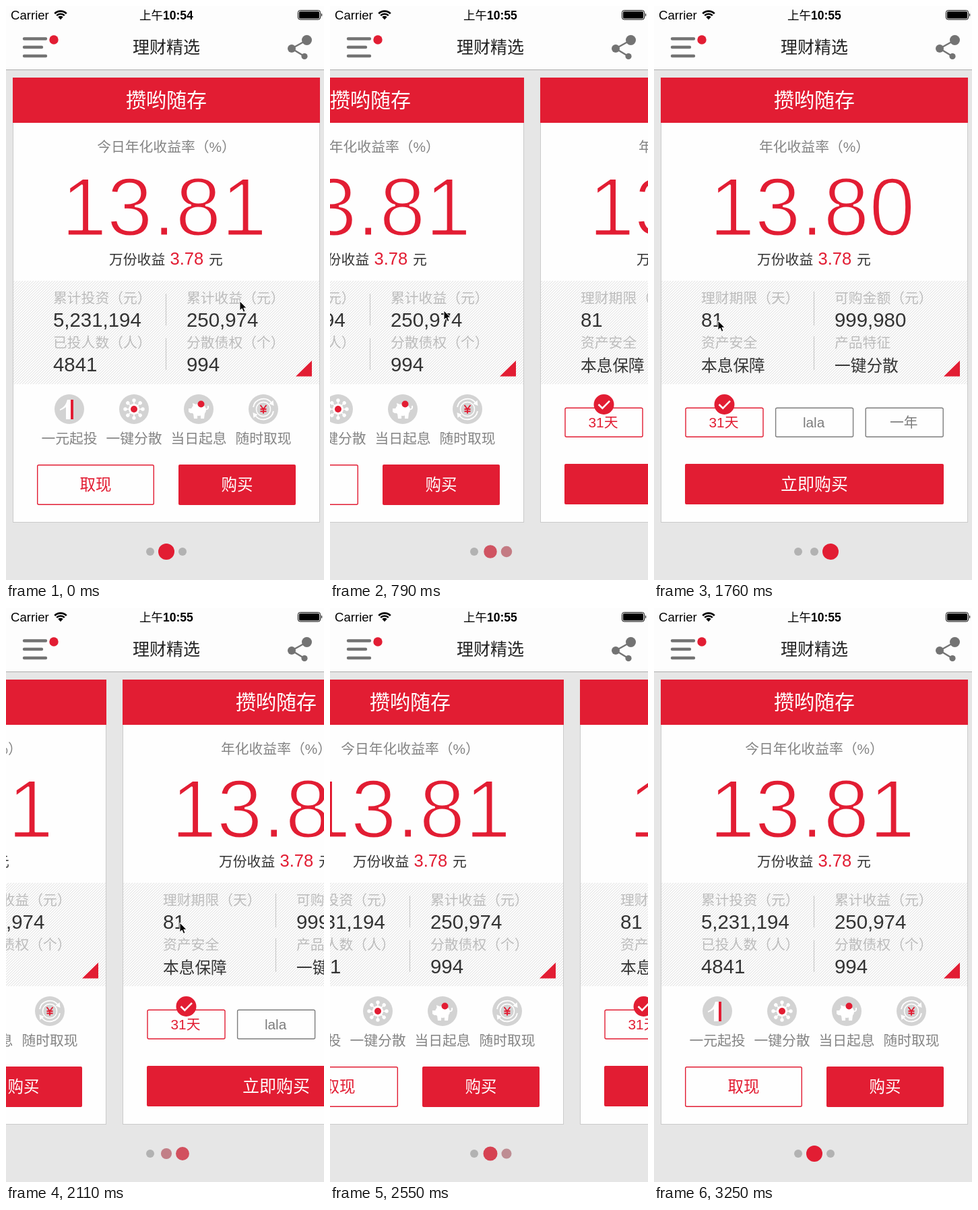
Recreate the animation shown at these times as an HTML page. Size 472 by 850 pixels, loop 3400 ms.

```html
<!DOCTYPE html>
<html lang="zh-CN">
<head>
<meta charset="utf-8">
<title>理财精选</title>
<style>
html, body { margin: 0; width: 100%; height: 100%; overflow: hidden; background: #e6e6e6; }
svg { display: block; width: 472px; height: 850px; }
text { font-family: "Liberation Sans", "Noto Sans CJK SC", "Noto Sans CJK", sans-serif; font-weight: 300; white-space: pre; }
.mid { text-anchor: middle; }
.rate { stroke: #fefefe; stroke-width: 3px; stroke-linejoin: round; }
</style>
</head>
<body>
<svg id="stage" viewBox="0 0 472 850" xmlns="http://www.w3.org/2000/svg"></svg>
<script>
const RED = '#e21d33', INK = '#333', GREY = '#848484', PALE = '#bcbcbc';
const LOOP = 3400, PAGE = 480;

// ---------- drawing helpers ----------
const text = (x, y, size, str, fill, cls = '') =>
  `<text x="${x}" y="${y}" font-size="${size}" fill="${fill}" class="${cls}">${str}</text>`;
const mid = (x, y, size, str, fill) => text(x, y, size, str, fill, 'mid');
const rect = (x, y, w, h, fill, more = '') =>
  `<rect x="${x}" y="${y}" width="${w}" height="${h}" fill="${fill}" ${more}/>`;
const disc = (x, y, r, fill, more = '') =>
  `<circle cx="${x}" cy="${y}" r="${r}" fill="${fill}" ${more}/>`;
const path = (d, fill, stroke = 'none', width = 0, more = '') =>
  `<path d="${d}" fill="${fill}" stroke="${stroke}" stroke-width="${width}" ${more}/>`;
const frame = (x, y, w, h, color) =>
  rect(x, y, w, h, '#fefefe', `rx="2" stroke="${color}" stroke-width="1.4"`);

// ---------- cards ----------
function stat(x, y, label, value, cjk) {
  return text(x, y, 20.8, label, PALE) +
    text(x, y + 34.8, cjk ? 23.7 : 29.4, value, INK);
}

function card(dx, caption, rate, stats, bars, rest) {
  const [a, b, c, d] = stats;
  return `<g transform="translate(${dx} 0)">` +
    rect(10.5, 106.5, 455, 658, '#fefefe', 'stroke="#cbcbcb"') +
    rect(10, 106, 456, 67, RED) +
    mid(238, 150, 30, '攒哟随存', '#fff') +
    mid(238, 216, 20.8, caption, GREY) +
    text(82, 339.5, 122, rate, RED, 'rate') +
    text(153, 382.5, 20.8, '万份收益', INK) +
    text(243.5, 383, 25.5, '3.78', RED) +
    text(301, 382.5, 20.8, '元', INK) +
    rect(11, 407, 454, 153, 'url(#hatch)') +
    stat(70, 440.2, ...a) + stat(268, 440.2, ...b) +
    stat(70, 506.2, ...c) + stat(268, 506.2, ...d) +
    bars.map(([y, h]) => rect(237, y, 1, h, '#c4c4c4')).join('') +
    path('M454 525V548.5H430Z', RED) + rest + '</g>';
}

// ---------- feature icons, each around its own centre ----------
const one = path('M-14 0C-9 -2 -5 -6 -3 -14H2V15H-5V-3C-8 -1 -11 1 -14 2Z', '#fff') +
  rect(2, -14, 4, 29, RED);

let spread = disc(0, 0, 8, '#fff');
for (let i = 0; i < 8; i++) {
  spread += `<g transform="rotate(${i * 45})">` +
    path('M0 0V-12', 'none', '#fff', 1.6) + disc(0, -13, 2.7, '#fff') + '</g>';
}
spread += disc(0, 0, 5, RED);

const pig = '<ellipse cx="0" cy="1" rx="11" ry="9" fill="#fff"/>' +
  path('M-9 -9L-4 -7L-8 -2ZM-15 -1H-8V6H-12L-15 4ZM-8 6H-2V14H-7ZM3 6H9L8 14H3Z', '#fff') +
  path('M10 0Q15 1 14 -5', 'none', '#fff', 2) + disc(3.5, -7.5, 5, RED);

const arc = path('M-15 -3A15.3 15.3 0 0 1 12 -9.5', 'none', '#fff', 1.8) +
  path('M15.5 -5L8.5 -8L14.5 -13Z', '#fff');
const cycle = arc + `<g transform="rotate(180)">${arc}</g>` +
  disc(0, 0, 10.5, 'none', 'stroke="#fff" stroke-width="1.4"') +
  path('M-4.5 -6L0 0L4.5 -6M0 0V6.5M-4.5 0H4.5M-4.5 3.2H4.5', 'none', RED, 1.9);

const features = [[one, '一元起投'], [spread, '一键分散'], [pig, '当日起息'], [cycle, '随时取现']]
  .map(([icon, label], i) => {
    const x = 94 + i * 96;
    return `<g transform="translate(${x} 597)">${disc(0, 0, 22, '#d3d3d3')}${icon}</g>` +
      mid(x, 648, 20.8, label, GREY);
  }).join('');

const current = card(0, '今日年化收益率（%）', '13.81', [
  ['累计投资（元）', '5,231,194'], ['累计收益（元）', '250,974'],
  ['已投人数（人）', '4841'], ['分散债权（个）', '994']
], [[426, 47], [492, 47]],
  features + frame(46.7, 679.7, 172.6, 58.6, RED) + mid(133, 717, 23.5, '取现', RED) +
  rect(256, 679, 174, 60, RED, 'rx="2"') + mid(343, 717, 23.5, '购买', '#fff'));

const fixed = card(PAGE, '年化收益率（%）', '13.80', [
  ['理财期限（天）', '81'], ['可购金额（元）', '999,980'],
  ['资产安全', '本息保障', 1], ['产品特征', '一键分散', 1]
], [[423, 50], [489, 50]],
  [['31天', RED], ['lala', '#7d7d7d'], ['一年', '#7d7d7d']].map(([label, color], i) =>
    frame(47 + i * 133.6, 595.3, 115, 42.7, color) +
    mid(103.5 + i * 133.6, 624, 20.8, label, color)).join('') +
  disc(104.5, 590, 15, RED) +
  path('M96.5 590L102.3 595.7L113 584.8', 'none', '#fff', 2.6) +
  rect(46, 678, 384, 60, RED, 'rx="2"') + mid(238, 716.5, 25, '立即购买', '#fff'));

// ---------- bars at the top ----------
const wifi = [[12.3, 2.6], [8.2, 2.6]].map(([r, w]) => {
  const k = r * 0.71;
  return path(`M${81 - k} ${20 - k}A${r} ${r} 0 0 1 ${81 + k} ${20 - k}`, 'none', '#000', w);
}).join('') + path('M81 20.3L77.3 16.2A5.4 5.4 0 0 1 84.7 16.2Z', '#000');

const topBar = rect(0, 0, 472, 94, '#fdfdfd') + rect(0, 94, 472, 1, '#adadad') +
  text(7, 20, 18.6, 'Carrier', '#000') + wifi +
  '<text x="198" y="20" font-size="17.5"><tspan style="font-weight:500">上午</tspan>' +
  '<tspan id="clock" style="font-weight:700"></tspan></text>' +
  rect(433.5, 6.5, 33, 13.5, 'none', 'rx="3" stroke="#000"') +
  rect(435, 8, 30, 10.5, '#000', 'rx="1.5"') + path('M468 10.5Q470.5 13.2 468 16Z', '#000') +
  path('M27 48.5H59M27 61H53M27 74H59', 'none', '#737373', 4.4, 'stroke-linecap="round"') +
  disc(71, 50, 6.7, RED) +
  '<text x="238" y="70" font-size="25" fill="#222" class="mid" style="font-weight:500">理财精选</text>' +
  path('M446.5 50.5L424 63L443 74.5', 'none', '#737373', 2.4) +
  disc(446.5, 50.5, 7.5, '#737373') + disc(424, 63, 6, '#737373') + disc(443, 74.5, 4.6, '#737373');

const stage = document.getElementById('stage');
stage.innerHTML =
  '<defs><pattern id="hatch" width="4" height="4" patternUnits="userSpaceOnUse">' +
  rect(0, 0, 4, 4, '#fcfcfc') +
  path('M-1 1L1 -1M0 4L4 0M3 5L5 3', 'none', '#dedede', 0.9) + '</pattern></defs>' +
  rect(0, 0, 472, 850, '#e6e6e6') +
  `<g id="deck">${current}${fixed}</g>` + topBar +
  [214, 238, 262].map(x => disc(x, 808, 6, '#b2b2b2', 'class="dot"')).join('') +
  '<g id="arrow">' +
  path('M0 0V14L3.2 11L5.5 16.2L8 15.2L5.8 10.2H10Z', '#000', '#fff', 1) + '</g>';

// ---------- motion ----------
// The screen refreshes only at these moments (ms).
const TICKS = [0, 180, 270, 360, 450, 540, 620, 700, 790, 880, 970, 1060, 1150, 1240,
  1330, 1420, 1510, 1590, 1760, 1850, 1940, 2030, 2110, 2200, 2290, 2380, 2460, 2550,
  2640, 2730, 2810, 2900, 3160, 3250];

const SCROLL = [[0, 0], [130, 0], [790, -178], [1060, -455], [1150, -475], [1240, -480],
  [1760, -480], [2110, -317], [2380, -215], [2730, -25], [2810, -5], [2900, 0]];
const ARROW_X = [[0, 347], [130, 347], [790, 169], [1240, 175], [1510, 71], [1590, 76],
  [1760, 95], [2110, 258], [2380, 360], [2550, 490], [2900, 480], [3160, 460]];
const ARROW_Y = [[0, 437], [130, 437], [790, 451], [1240, 456], [1590, 467], [1760, 466],
  [2380, 466], [2550, 520], [2900, 870], [3160, 849.5], [3250, 870]];

// Smooth curve through the points without overshoot.
function along(points, t) {
  const last = points.length - 1;
  if (t >= points[last][0]) return points[last][1];
  const slope = i => i < 0 || i >= last ? 0 :
    (points[i + 1][1] - points[i][1]) / (points[i + 1][0] - points[i][0]);
  const tangent = i => {
    const a = slope(i - 1), b = slope(i);
    return a * b > 0 ? 2 * a * b / (a + b) : 0;
  };
  let i = 0;
  while (t >= points[i + 1][0]) i++;
  const [t0, v0] = points[i], [t1, v1] = points[i + 1];
  const h = t1 - t0, u = (t - t0) / h, w = 1 - u;
  return v0 * (1 + 2 * u) * w * w + v1 * u * u * (3 - 2 * u) +
    h * u * w * (tangent(i) * w - tangent(i + 1) * u);
}

const deck = document.getElementById('deck');
const arrow = document.getElementById('arrow');
const clock = document.getElementById('clock');
const dots = document.querySelectorAll('.dot');
const mix = (a, b, p) => Math.round(a + (b - a) * p);

function draw() {
  const now = performance.now() % LOOP;
  const t = TICKS.filter(tick => tick <= now).pop();
  const x = Math.round(along(SCROLL, t));
  deck.setAttribute('transform', `translate(${x} 0)`);
  arrow.setAttribute('transform', `translate(${along(ARROW_X, t)} ${along(ARROW_Y, t)})`);
  clock.textContent = t < 450 ? '10:54' : '10:55';
  const page = 1 - x / PAGE;
  dots.forEach((dot, i) => {
    const on = Math.max(0, 1 - Math.abs(page - i));
    dot.setAttribute('r', 6 + 6 * on);
    dot.setAttribute('fill', `rgb(${mix(178, 226, on)},${mix(178, 29, on)},${mix(178, 51, on)})`);
  });
  requestAnimationFrame(draw);
}
draw();
</script>
</body>
</html>
```
